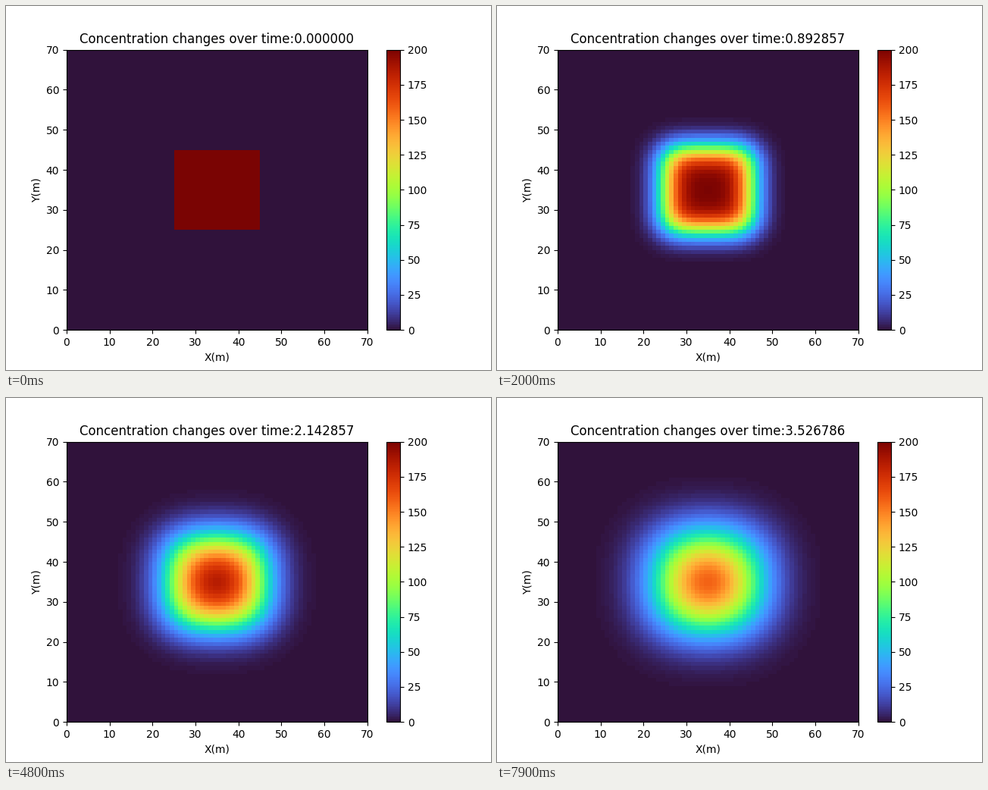
Recreate the animation shown at these times as a matplotlib script. Size 640x480 px, loop 8 s.

```python
import numpy as np
import matplotlib.pyplot as plt
from matplotlib.animation import FuncAnimation

SIZE = 70            # metres, one cell per metre
STEPS = 80
DIFFUSIVITY = 5.6
DT = 1 / (4 * DIFFUSIVITY)   # explicit stability limit
PEAK = 200


def diffuse(c):
    """One explicit heat-equation step with fixed edges."""
    r = DIFFUSIVITY * DT
    out = c.copy()
    out[1:-1, 1:-1] += r * (c[2:, 1:-1] + c[:-2, 1:-1]
                            + c[1:-1, 2:] + c[1:-1, :-2]
                            - 4 * c[1:-1, 1:-1])
    return out


def solve():
    c = np.zeros((SIZE, SIZE))
    c[25:45, 25:45] = PEAK
    fields = [c]
    for _ in range(STEPS - 1):
        fields.append(diffuse(fields[-1]))
    return fields


fields = solve()

fig, ax = plt.subplots(figsize=(6.4, 4.8), dpi=100)
mesh = ax.pcolormesh(fields[0], cmap="turbo", vmin=0, vmax=PEAK)
fig.colorbar(mesh, ax=ax)
ax.set_xlabel("X(m)")
ax.set_ylabel("Y(m)")
title = ax.set_title("")


def update(i):
    mesh.set_array(fields[i])
    title.set_text(f"Concentration changes over time:{i * DT:.6f}")
    return mesh, title


anim = FuncAnimation(fig, update, frames=STEPS, interval=100,
                     repeat=True, repeat_delay=0, blit=False)
plt.show()
```
